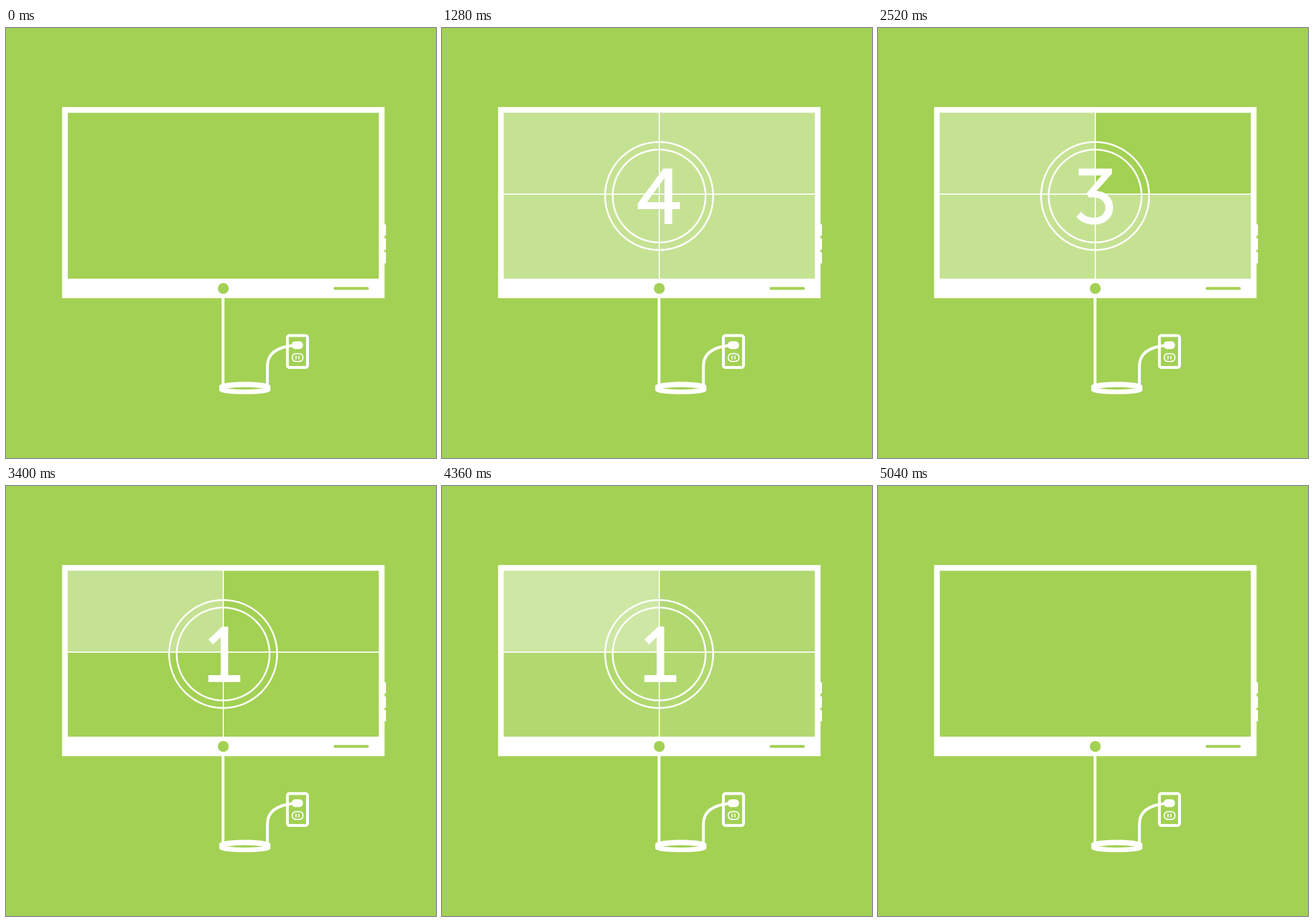
Recreate the animation shown at these times as an HTML page. Size 748 by 748 pixels, loop 8.64 s.

```html
<!DOCTYPE html>
<html lang="en">
<head>
<meta charset="utf-8">
<title>Countdown on a screen</title>
<style>
  html, body { margin: 0; width: 100%; height: 100%; overflow: hidden; background: #a3d154; }
  svg { display: block; width: 100vw; height: 100vh; }
  .line { fill: none; stroke: #fff; }
  .green { fill: #a3d154; }
</style>
</head>
<body>
<svg viewBox="0 0 748 748" fill="#fff">
  <rect class="green" width="748" height="748"/>

  <!-- Monitor -->
  <path fill-rule="evenodd" d="M97.5 137.5H658.5V470H97.5ZM107.5 147.5V436H648.5V147.5Z"/>
  <path d="M658 341.5h3v19.500h-3zM658 366h3v19.500h-3zM658 390h3v19.500h-3z"/>
  <circle class="green" cx="378" cy="453" r="9.500"/>
  <rect class="green" x="570" y="450.5" width="61" height="5" rx="2.500"/>

  <!-- Cord and outlet -->
  <path class="line" stroke-width="5" d="M377.5 469V621M454.700 621V588C454.700 567 471 555 501 552"/>
  <path fill-rule="evenodd" d="M371 623C371 617.500 395 615.500 415.500 615.500S460 617.500 460 623V630C460 635.500 436 637 415.500 637S371 635.500 371 630ZM383 627Q415.500 631 448 627Q415.500 622.500 383 627Z"/>
  <rect class="line" stroke-width="5" x="489.500" y="535" width="35" height="55.500" rx="3.500"/>
  <rect x="497" y="545" width="19.500" height="13.500" rx="6"/>
  <rect class="line" stroke-width="2" x="498" y="566.500" width="18.500" height="13.500" rx="6"/>
  <path class="line" stroke-width="2" d="M504.500 570V576.500M509.500 570V576.500"/>

  <!-- Film leader -->
  <g id="leader">
    <g id="quads" fill-opacity=".37">
      <rect x="378" y="147.500" width="270.500" height="141.500"/>
      <rect x="378" y="289" width="270.500" height="147"/>
      <rect x="107.500" y="289" width="270.500" height="147"/>
      <rect x="107.500" y="147.500" width="270.500" height="141.500"/>
    </g>
    <rect id="flash" x="107.500" y="147.500" width="541" height="288.500" fill-opacity=".16"/>
    <path class="line" stroke-width="2" d="M378 147V436M107 289H649"/>
    <g class="line" stroke-width="3">
      <circle cx="377.700" cy="292.200" r="94"/>
      <circle cx="377.700" cy="292.200" r="80.800"/>
    </g>
    <path id="digit" fill-rule="evenodd"/>
  </g>
</svg>
<script>
  const LOOP = 8640, STEP = 40;
  const START = 960, FADE = 4520, END = 5040;
  const digits = [
    { from: 960, d: 'M385 244.500H400.500V303H414V315H400.500V341H387V315H340.500V305.500ZM387 261L356.500 303H387Z' },
    { from: 2400, d: 'M349 244.500H407V253.500L380 283.500C397 284 409 296 409 312C409 330 395 342 376 342C363 342 352 337 345 328.500L353 319.500C359 326.500 366 330 376 330C388 330 395.500 322.500 395.500 312.500C395.500 301.500 387 294.500 373 294.500H366.500L363 287.500L389 256.500H349Z' },
    { from: 2880, d: 'M345 267C350 252 361 243 376 243C394 243 406 254 406 270C406 282 400 290 390 300L363 329H408V341H346V330L380 294C388 286 392 279 392 271C392 262 386 255.500 376 255.500C366 255.500 360 261 356 271Z' },
    { from: 3360, d: 'M376 244.500H386.500V329H407.500V341H352V329H373.500V263L360 275.500L352 267Z' }
  ];
  // Each time toggles the projector flicker.
  const flicker = [1040, 1080, 1240, 1280, 1480, 1520, 1720, 1800, 1920, 2080, 2120, 2520,
    3440, 3480, 3680, 3840, 3880, 3920, 3960, 4000, 4160, 4200, 4360, 4400];

  const get = id => document.getElementById(id);
  const leader = get('leader'), flash = get('flash'), digit = get('digit');
  const quads = [...get('quads').children];
  const show = (el, on) => el.setAttribute('visibility', on ? 'inherit' : 'hidden');

  function draw(ms) {
    const t = Math.floor((ms % LOOP) / STEP) * STEP;
    const fade = Math.min(1, Math.max(0, (END - t) / (END - FADE)));
    const index = Math.max(0, digits.filter(x => x.from <= t).length - 1);
    leader.setAttribute('opacity', t < START ? 0 : fade);
    digit.setAttribute('d', digits[index].d);
    quads.forEach((q, i) => show(q, i >= index));
    show(flash, flicker.filter(x => x <= t).length % 2 === 1);
  }

  const origin = performance.now();
  function tick() {
    draw(performance.now() - origin);
    requestAnimationFrame(tick);
  }
  tick();
</script>
</body>
</html>
```
